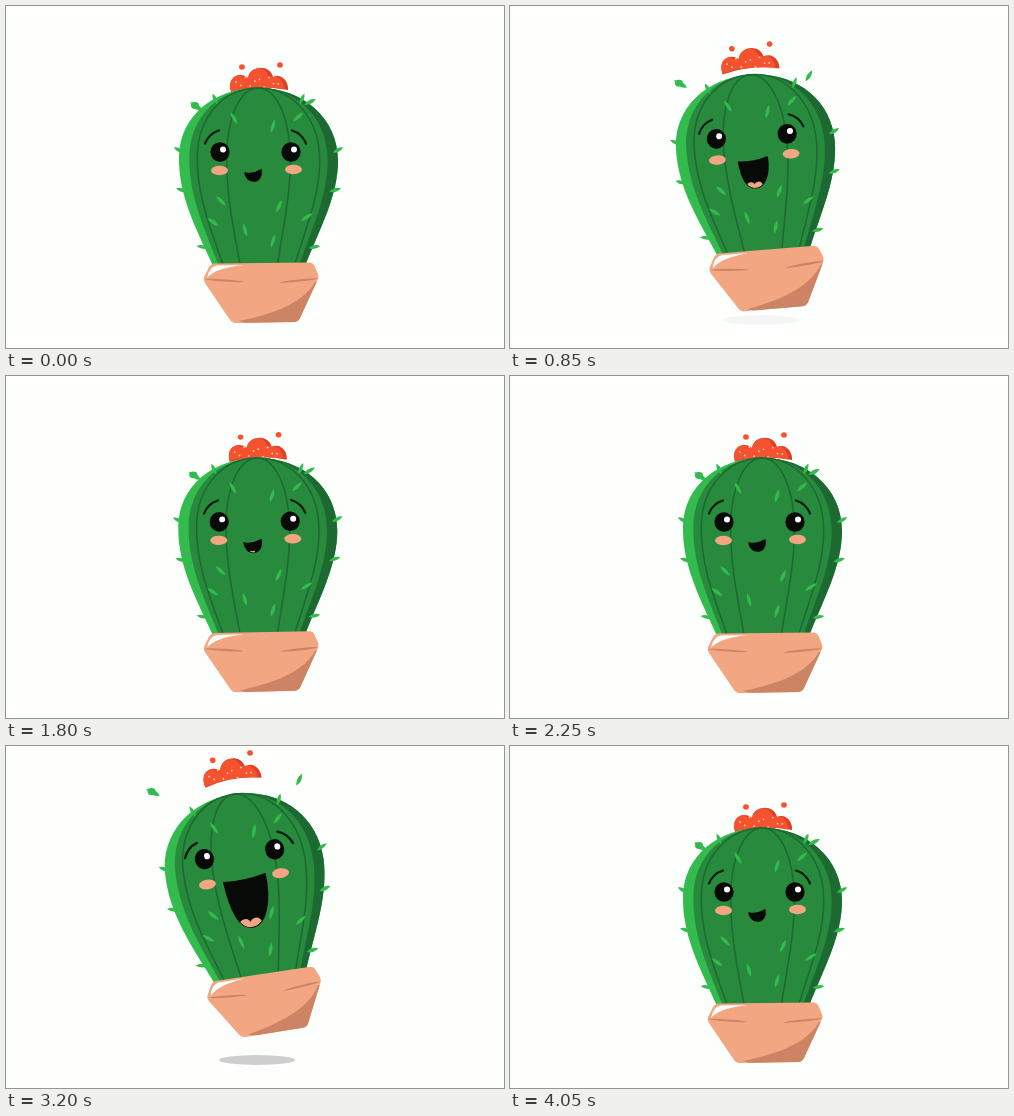
Recreate the animation shown at these times as an HTML page with a canvas. Size 498 by 342 pixels, loop 4.1 s.

```html
<!DOCTYPE html>
<html>
<head>
<meta charset="utf-8">
<style>
html, body { margin: 0; width: 100%; height: 100%; overflow: hidden; background: #fdfffd; }
canvas { display: block; }
</style>
</head>
<body>
<canvas id="stage" width="498" height="342"></canvas>
<script>
const ctx = document.getElementById('stage').getContext('2d');
const LOOP = 4100, STEP = 50, RAMP = 360;
const PIVOT = { x: 255, y: 257.5 }, MIDDLE = 252.5;
const GREEN = '#288a3d', LIGHT = '#34bb4e', DARK = '#1c6a31';
const PEACH = '#f2a682', CLAY = '#cd8464', RED = '#f5532f', INK = '#080a08';

const body = new Path2D('M207 260C191 224 172 190 173 150C174 110 208 82 252 82C297 82 332 112 332 155C332 190 314 222 299 260Z');
const flower = new Path2D('M225 86C222 75 227 69 235 69Q239 69 242 72C244 59 264 58 267 71C276 67 283 76 282 84Q254 78 225 86Z');
const pot = new Path2D('M208 257.5L304 256.5Q307 257 308 259L312 268Q313 271 312 273L294 312Q292 316 288 316L230 317Q226 317 224 314L199 277Q197 274 198 271L203 261Q205 258 208 257.5Z');
const potShade = new Path2D('M309 276C299 294 274 307 233 315L250 320L330 320L330 276Z');
const potShine = new Path2D('M201 272Q203 261 211 259.5L238 259Q209 262 201 272Z');
const brow = new Path2D('M-7 7Q-3 -3 7 -6');
const innerLeaves = [[228, 112], [267, 120], [292, 111], [215, 195], [207, 216], [239, 224], [273, 200], [301, 211], [267, 235]];

const smooth = u => { u = Math.min(1, Math.max(0, u)); return u * u * (3 - 2 * u); };
const jump = (t, up, down) => smooth((t - up) / RAMP) - smooth((t - down) / RAMP);
const bump = (t, a, b) => t > a && t < b ? Math.sin(Math.PI * (t - a) / (b - a)) : 0;

// Half the width of the cactus at height y
const halfWidth = y => 79 * (y < 152 ? Math.sqrt(1 - ((152 - y) / 70) ** 2) : Math.cos((y - 152) * 0.009));

function narrowBody(k) {
  const path = new Path2D();
  path.addPath(body, new DOMMatrix([k, 0, 0, 1, MIDDLE * (1 - k), 0]));
  return path;
}

function fill(path, color) {
  ctx.fillStyle = color;
  ctx.fill(path);
}

function line(path, color, width) {
  ctx.strokeStyle = color;
  ctx.lineWidth = width;
  ctx.lineCap = ctx.lineJoin = 'round';
  ctx.stroke(path);
}

function oval(x, y, rx, ry, color) {
  ctx.fillStyle = color;
  ctx.beginPath();
  ctx.ellipse(x, y, rx, ry, 0, 0, 7);
  ctx.fill();
}

function moved(x, y, draw) {
  ctx.save();
  ctx.translate(x, y);
  draw();
  ctx.restore();
}

function clipped(path, draw) {
  ctx.save();
  ctx.clip(path);
  draw();
  ctx.restore();
}

function leaf(x, y, angle, length = 14, width = 3.6) {
  moved(x, y, () => {
    ctx.rotate(angle);
    const half = length / 2;
    fill(new Path2D(`M${-half} 0Q0 ${width} ${half} 0Q0 ${-width} ${-half} 0Z`), LIGHT);
  });
}

function drawFlower(lift) {
  moved(0, -14 * lift, () => {
    fill(flower, '#dc4027');
    clipped(flower, () => moved(-4, 0, () => fill(flower, RED)));
    for (let i = 0; i < 11; i++) oval(230 + 4.7 * i, 76 + 5 * Math.sin(2.4 * i), 0.9, 0.9, '#ffd3a8');
    for (const side of [-1, 1]) oval(255 + 19 * side, 60 - side, 2.9, 2.7, RED);
  });
}

function drawBody() {
  fill(body, LIGHT);
  clipped(body, () => {
    ctx.fillStyle = DARK;
    ctx.fillRect(MIDDLE, 80, 90, 190);
  });
  fill(narrowBody(0.87), GREEN);
  for (const k of [0.77, 0.4]) line(narrowBody(k), DARK, 1.5);
}

function drawLeaves(q) {
  for (const [x, y] of innerLeaves) leaf(x, y, Math.PI / 2 + (x - MIDDLE) * 0.021);
  for (const y of [93, 144, 184, 241]) {
    const rise = 1.15 * (93 / y) ** 2;
    for (const side of [-1, 1]) leaf(MIDDLE + side * (halfWidth(y) + 1), y, -side * rise, 12);
  }
  // The two that fly off
  moved(190 - 18 * q, 100 - 31 * q, () => {
    oval(-1, -0.5, 4, 3.4, LIGHT);
    leaf(0.5, 0.5, 0.6, 15, 5);
  });
  leaf(304 + 15 * q, 96 - 19 * q, -0.46 - 0.5 * Math.min(1, q * 4), 13, 4);
}

function drawMouth(q) {
  const m = q ** 0.9, r = Math.sqrt(m);
  const x = 247 + 4 * m, y = 165.5 + 8 * m * (1 - m) - 2 * m, w = 8 + 13 * m, h = 9.5 + 38 * m;
  const mouth = new Path2D();
  mouth.moveTo(x - w, y + 1.5);
  mouth.quadraticCurveTo(x, y + 3.5, x + w, y - 1.5);
  mouth.bezierCurveTo(x + w * 1.1, y + h * 0.5, x + w * 0.75, y + h, x + 1, y + h);
  mouth.bezierCurveTo(x - w * 0.65, y + h, x - w * 0.9, y + h * 0.5, x - w, y + 1.5);
  fill(mouth, INK);
  line(mouth, INK, 1.5);
  clipped(mouth, () => {
    for (const side of [-1, 1]) oval(x + side * 5.5 * r, y + h - 2 * r, 6.5 * r, 6.5 * r, PEACH);
  });
}

function drawFace(q, lift) {
  for (const side of [-1, 1]) {
    const x = 249.5 + 35.5 * side, y = 146 - 6 * lift;
    oval(x, y, 9.6, 9.8, INK);
    oval(x + 3, y - 2.5, 3, 3, '#fff');
    oval(250.5 + 37 * side, 164 - side / 2, 8.5, 4.7, PEACH);
    moved(249.5 + side * (43.5 + 4 * q), 130.5 - lift, () => {
      ctx.scale(-side, 1);
      line(brow, '#0c1a10', 2.2);
    });
  }
  drawMouth(q);
}

function drawPot() {
  fill(pot, PEACH);
  clipped(pot, () => {
    fill(potShade, CLAY);
    fill(potShine, '#fff');
    for (const [x, angle] of [[218, 0.07], [293, -0.1]]) moved(x, 274.5, () => {
      ctx.rotate(angle);
      oval(0, 0, 19, 1.1, CLAY);
    });
  });
}

function draw(t) {
  const q = jump(t, 680, 1478) + jump(t, 2600, 3293), lift = smooth(q);
  const squash = bump(t, 1838, 2250) + bump(t, 2250, 2600) + 0.25 * bump(t, 0, 600);
  const stretch = 1 + 0.04 * q - 0.2 * q * (1 - q) ** 3;

  ctx.fillStyle = '#fdfffd';
  ctx.fillRect(0, 0, 498, 342);
  ctx.globalAlpha = q * q;
  oval(251, 314, 38, 5, '#cecece');
  ctx.globalAlpha = 1;

  ctx.save();
  ctx.translate(253, 317);
  ctx.scale(1 + 0.045 * squash, 1 - 0.015 * squash);
  ctx.translate(PIVOT.x + q - 253, PIVOT.y - 29 * q - 317);
  ctx.rotate(-8 * q ** 0.85 * Math.PI / 180);

  ctx.save();
  ctx.scale(1, stretch);
  ctx.translate(-PIVOT.x, -PIVOT.y);
  drawFlower(lift);
  drawBody();
  drawLeaves(q);
  drawFace(q, lift);
  ctx.restore();

  ctx.translate(-PIVOT.x, -PIVOT.y);
  drawPot();
  ctx.restore();
}

const start = performance.now();
function tick() {
  const t = (performance.now() - start) % LOOP;
  draw(Math.floor(t / STEP) * STEP);
  requestAnimationFrame(tick);
}
tick();
</script>
</body>
</html>
```
